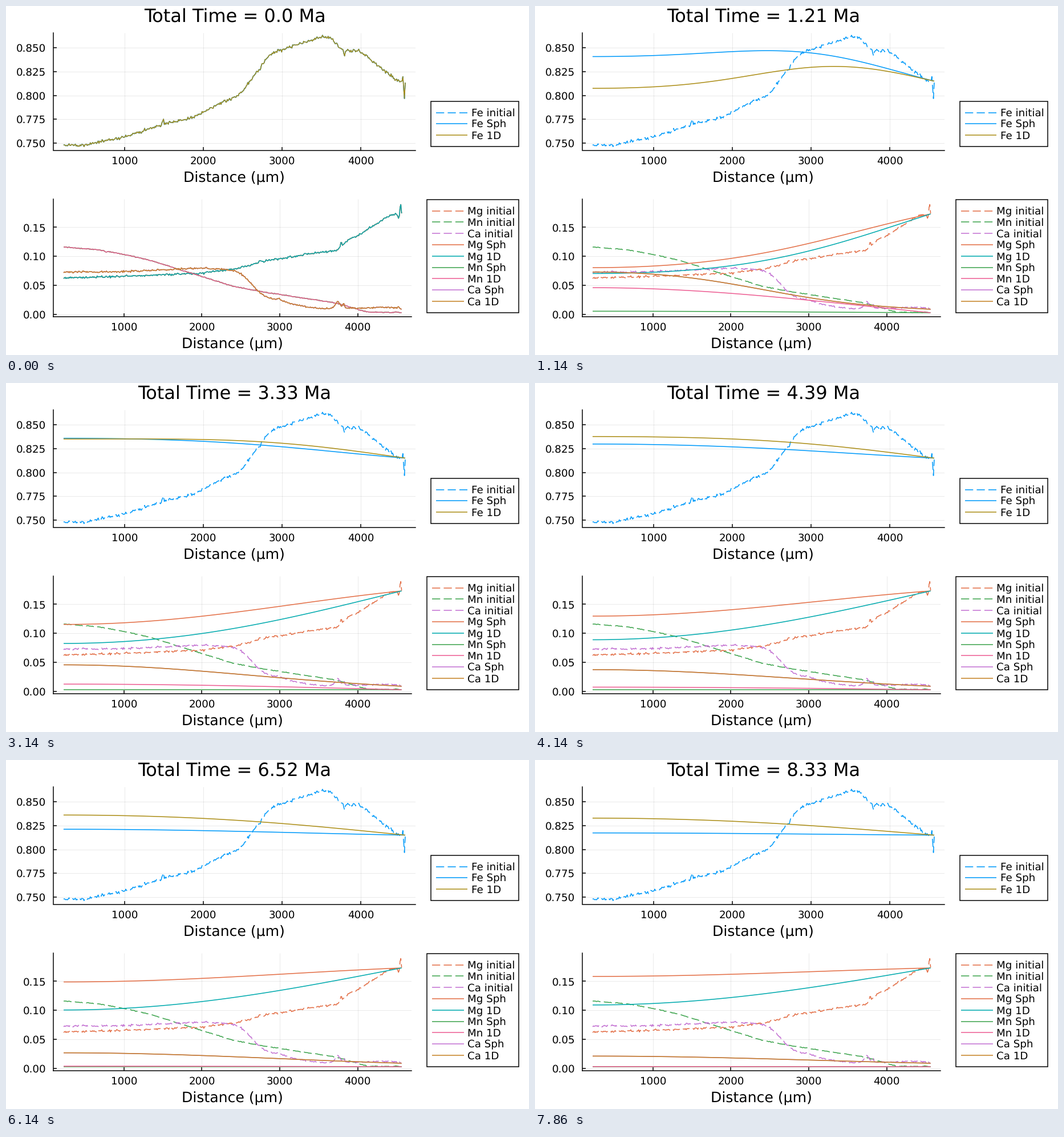
These frames come from a looping animation (917x611 px, 8 s). A matplotlib script:

```python
import numpy as np
import matplotlib.pyplot as plt
from matplotlib.animation import FuncAnimation
from matplotlib.patches import Rectangle

W, H, DPI = 917, 611, 100
LOOP_MS, TICK_MS = 8000, 40
STEPS = 56                  # states shown in one loop
STEP = 15 / 99              # Myr per state
X0, X1 = 224.0, 4565.0      # profile ends, µm
LENGTH = X1 - X0

BLUE, ORANGE, GREEN, PURPLE = "#009AFA", "#E36F47", "#3EA44E", "#C371D2"
GOLD, TEAL, PINK, BROWN = "#AC8E18", "#00AAAE", "#ED5E93", "#C68225"


def px(n):
    """Pixels to points."""
    return n * 72 / DPI


plt.rcParams.update({
    "font.family": "DejaVu Sans",
    "text.hinting": "none",
    "axes.linewidth": px(1.5),
    "lines.linewidth": px(1.55),
    "lines.solid_capstyle": "butt",
})
TICK, GUIDE, TITLE = px(18.28), px(25.1), px(32)
DASH = (0, (9.2, 4.0))

# ---- starting profiles: rounded trend, narrow bumps, measuring noise ----
dist = np.linspace(X0, X1, 435)
rng = np.random.default_rng(7)


def trend(xs, ys, window=15):
    """Straight runs between key points with the corners rounded off."""
    y = np.interp(dist, [X0, *xs, X1], ys)
    y = np.pad(y, window // 2, "reflect", reflect_type="odd")
    return np.convolve(y, np.ones(window) / window, "valid")


def bump(at, width, height):
    return height * np.exp(-((dist - at) / width) ** 2)


smooth = {
    "Fe": trend([507, 1000, 1490, 1848, 2478, 2850, 3152, 3520, 3620, 3770,
                 3971, 4480],
                [.748, .7485, .7565, .770, .7765, .802, .844, .852, .8620,
                 .861, .846, .848, .814, .815]),
    "Mg": trend([1000, 1996, 2487, 2740, 3366, 3755, 3857, 3960, 4410],
                [.063, .066, .071, .0796, .090, .1042, .1105, .129, .132,
                 .171, .173]),
    "Mn": trend([692, 1000, 1315, 2414, 2800, 3733, 4120],
                [.116, .111, .1032, .094, .048, .0385, .0195, .004, .003]),
    "Ca": trend([1000, 1996, 2420, 2520, 2790, 3250, 3513, 4480],
                [.073, .0737, .080, .0757, .069, .031, .0155, .010, .0125,
                 .009]),
}
bumps = {
    "Fe": bump(1488, 12, .006) + bump(3793, 10, -.006)
          + bump(4538, 8, .006) + bump(4552, 8, -.021),
    "Mg": bump(2751, 20, .003) + bump(3790, 10, .007)
          + bump(4526, 12, -.007) + bump(4551, 8, .021),
    "Mn": bump(766, 15, -.002) + bump(4502, 30, .001),
    "Ca": bump(2985, 25, .004) + bump(3745, 40, .012)
          + bump(3820, 18, .008) + bump(4524, 15, .003),
}
noise = {"Fe": .0009, "Mg": .0009, "Mn": .0003, "Ca": .0007}
calm = dist < X1 - 60       # no noise on the rim
initial = {name: y + bumps[name] + calm * rng.normal(0, noise[name], y.size)
           for name, y in smooth.items()}

# ---- multicomponent diffusion in garnet at 900 °C and 6 kbar ----
N, SUB = 90, 6
RT = 8.3145 * 1173.15
MYR = 365.25 * 86400e6


def arrhenius(d0, energy, volume):
    """Tracer diffusivity in µm²/Myr."""
    return d0 * 1e8 * MYR * np.exp(-(energy * 4.1855 + 600 * volume) / RT)


D = np.array([arrhenius(6.4e-4, 65824, 5.6),    # Fe
              arrhenius(1.1e-3, 67997, 5.3),    # Mg
              arrhenius(5.1e-4, 60569, 6.0)])   # Mn
D_CA = D[0] / 2


def coupling(c):
    """Matrix of diffusivities for each row of (Fe, Mg, Mn)."""
    total = c @ D + (1 - c.sum(1)) * D_CA
    cross = (c * D / total[:, None])[:, :, None] * (D - D_CA)
    return np.diag(D) - cross


def diffuse(c, power):
    """Profiles at each step; power 0 is a plane, 2 a sphere."""
    r = np.linspace(0, LENGTH, N)
    face = (r[1:] + r[:-1]) / 2
    edge = np.r_[0, face, LENGTH]
    vol = np.diff(edge ** (power + 1))[:, None, None] / (power + 1)
    area = (face ** power / r[1])[:, None, None]
    lo, hi = np.arange(N - 1), np.arange(1, N)
    eye, dt = np.eye(3 * N), STEP / SUB
    out = [c]
    for k in range(1, STEPS):
        theta = 1 if k == 1 else .5     # implicit start damps ringing
        for _ in range(SUB):
            g = area * coupling((c[1:] + c[:-1]) / 2)
            a = np.zeros((N, 3, N, 3))
            a[lo, :, hi, :] += g / vol[lo]
            a[lo, :, lo, :] -= g / vol[lo]
            a[hi, :, lo, :] += g / vol[hi]
            a[hi, :, hi, :] -= g / vol[hi]
            a[-1] = 0                   # fixed rim
            a = a.reshape(3 * N, 3 * N) * dt
            rhs = c.ravel() + (1 - theta) * (a @ c.ravel())
            c = np.linalg.solve(eye - theta * a, rhs).reshape(N, 3)
        out.append(c)
    return out


nodes = np.linspace(X0, X1, N)
start = np.array([np.interp(nodes, dist, y) for y in smooth.values()])
start = (start / start.sum(0))[:3].T
sphere, plane = diffuse(start, 2), diffuse(start, 0)

# ---- figure ----
fig = plt.figure(figsize=(W / DPI, H / DPI), dpi=DPI, facecolor="white")


def panel(left, top, right, bottom, xlim, ylim, yticks, fmt):
    ax = fig.add_axes([left / W, 1 - bottom / H,
                       (right - left) / W, (bottom - top) / H])
    ax.set(xlim=xlim, ylim=ylim)
    ax.set_xticks(range(1000, 5000, 1000))
    ax.set_yticks(yticks, [format(v, fmt) for v in yticks])
    ax.spines[["top", "right"]].set_visible(False)
    ax.tick_params(direction="in", length=px(6), width=px(1.5),
                   labelsize=TICK)
    ax.tick_params(axis="x", pad=px(10.5))
    ax.tick_params(axis="y", pad=px(12.5))
    ax.grid(color="black", alpha=.1, lw=px(.8))
    ax.set_axisbelow(True)
    return ax


top = panel(83, 47, 718, 252.5, (94.2, 4695.7), (.7426, .8656),
            np.linspace(.75, .85, 5), ".3f")
low = panel(83, 338, 711, 543.5, (91.6, 4692.3), (-.0034, .1986),
            np.linspace(0, .15, 4), ".2f")

page = fig.add_axes([0, 0, 1, 1], xlim=(0, W), ylim=(H, 0))
page.axis("off")


def label(x, y, text, size, ha="center"):
    return page.text(x, y, text, fontsize=size, ha=ha, va="baseline")


title = label(401, 28, "", TITLE)
label(400, 307.5, "Distance (µm)", GUIDE)
label(397, 599, "Distance (µm)", GUIDE)


def legend(x, y, w, h, first, entries):
    page.add_patch(Rectangle((x, y), w, h, fc="white", ec="black",
                             lw=px(1.5)))
    for i, (name, color, style) in enumerate(entries):
        row = first + 19.8 * i
        page.plot([x + 9, x + 64.5], [row, row], color=color, ls=style)
        label(x + 71, row + 6.3, name, TICK, "left")


TOP = [("Fe initial", BLUE, DASH), ("Fe Sph", BLUE, "-"), ("Fe 1D", GOLD, "-")]
LOW = [("Mg initial", ORANGE, DASH), ("Mn initial", GREEN, DASH),
       ("Ca initial", PURPLE, DASH), ("Mg Sph", ORANGE, "-"),
       ("Mg 1D", TEAL, "-"), ("Mn Sph", GREEN, "-"), ("Mn 1D", PINK, "-"),
       ("Ca Sph", PURPLE, "-"), ("Ca 1D", BROWN, "-")]
legend(744.5, 166.5, 154.5, 79, 186.5, TOP)
legend(738, 338.5, 161, 198.5, 358.6, LOW)


def curves(ax, entries):
    return {name: ax.plot([], [], color=color, ls=style)[0]
            for name, color, style in entries}


lines = {**curves(top, TOP), **curves(low, LOW)}
for name, y in initial.items():
    lines[name + " initial"].set_data(dist, y)


def draw(frame):
    k = int((frame + .6) * TICK_MS * STEPS / LOOP_MS)
    title.set_text(f"Total Time = {round(k * STEP, 2)} Ma")
    for kind, run in (("Sph", sphere), ("1D", plane)):
        if k == 0:
            x, now = dist, initial
        else:
            x, now = nodes, dict(zip(("Fe", "Mg", "Mn"), run[k].T))
            now["Ca"] = 1 - sphere[k].sum(1)    # shared by both kinds
        for name, y in now.items():
            lines[f"{name} {kind}"].set_data(x, y)
    return [title, *lines.values()]


anim = FuncAnimation(fig, draw, frames=LOOP_MS // TICK_MS, interval=TICK_MS,
                     init_func=lambda: draw(0), repeat=True, repeat_delay=0)
plt.show()
```
